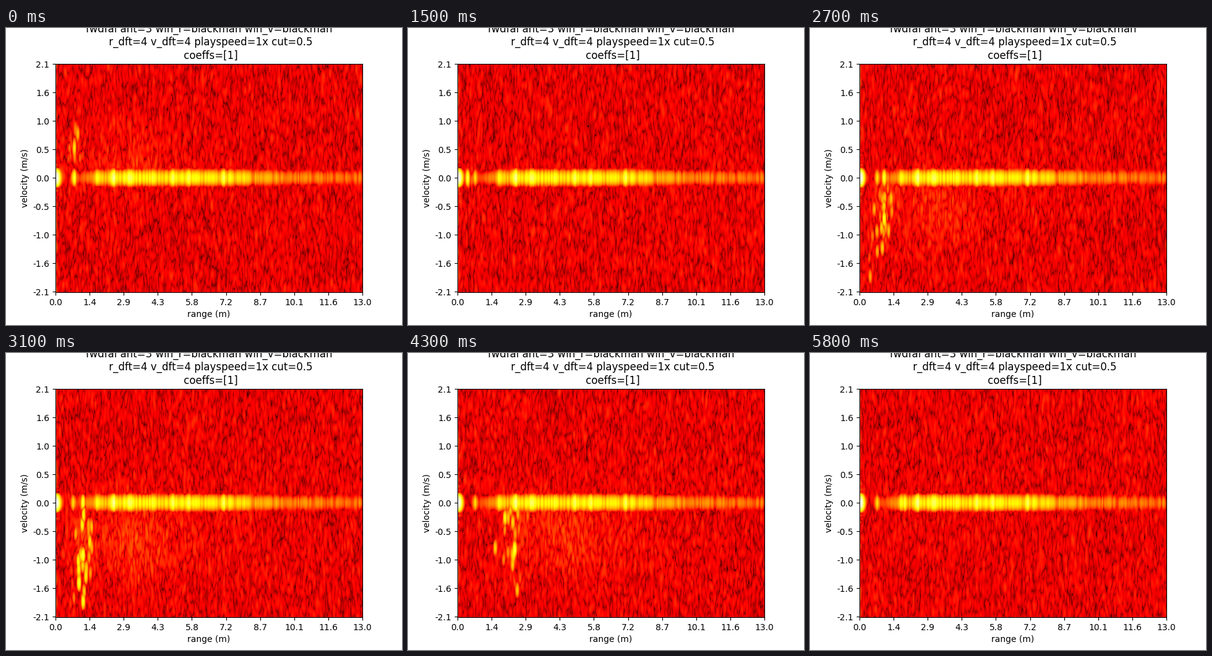
Write a matplotlib script that moves like this. It is 640 px wide and 480 px high and loops after 5.9 s.

```python
import numpy as np
import matplotlib.pyplot as plt
from matplotlib.animation import FuncAnimation

FRAMES, STEP = 59, 100
COLS, ROWS, HEIGHT = 496, 256, 370    # map columns, map rows, height in pixels
CHIRPS, SAMPLES, PAD = 64, 344, 516   # raw data block, padded range FFT
R_MAX, V_MAX = 13.0, 2.08
R_BIN, V_BIN = PAD / SAMPLES, HEIGHT / CHIRPS
FLOOR, PER_DB = 0.335, 0.0095         # colour level of the noise, step per dB

cols = np.arange(COLS)
rows = (np.arange(ROWS) - (ROWS - 1) / 2) * HEIGHT / ROWS  # px below v = 0


def lobe(d):
    """Spectrum of a Blackman window, d in bins, peak 1."""
    s = np.sinc
    return (0.42 * s(d) + 0.25 * (s(d - 1) + s(d + 1))
            + 0.04 * (s(d - 2) + s(d + 2))) / 0.42


def bump(x, x0, width):
    return np.exp(-((x - x0) / width) ** 2)


def amp(level):
    """Amplitude relative to the noise for a colour level."""
    return 10 ** ((level - FLOOR) / PER_DB / 20)


# The walker comes close, turns, walks away and stops: column and height.
TIMES = [0, .8, 1.5, 2.3, 3.1, 3.7, 4.3, 4.8, 5.2, 5.8]
TRACK_X = [30, 22, 16, 35, 44, 68, 92, 88, 78, 73]
TRACK_Y = [-48, -30, 2, 48, 85, 95, 75, 15, -25, 0]


def walker(t):
    return np.interp(t, TIMES, TRACK_X), np.interp(t, TIMES, TRACK_Y)


def body_level(y):
    return 0.47 + 3.5e-5 * y ** 2


def make_glints(n=170):
    """Short reflections of limbs scattered around the walker."""
    rng = np.random.default_rng(7)
    t = rng.uniform(-0.2, 5.4, n)
    x, y = walker(t)
    dx, dy, dl = rng.normal(size=(3, n))
    level = body_level(y) + 0.06 * dl
    phase = np.exp(2j * np.pi * rng.random(n))
    return (t, x + (3 + 0.1 * x) * dx, y + (4 + 0.45 * np.abs(y)) * dy,
            amp(np.minimum(level, 0.8)) * phase)


def make_profile():
    """Colour level of the static echoes along the range axis."""
    rng = np.random.default_rng(11)
    x = [0, 5, 11, 15, 21, 28, 34, 62, 92, 300, 320, 400, 496]
    y = [1.05, .9, .48, .33, .33, .72, .45, .62, .74, .71, .62, .55, .52]
    level = np.interp(cols, x, y)
    for peak in (66, 93, 121, 190, 214, 271):
        level += 0.12 * bump(cols, peak, 4)
    raw = rng.normal(size=(2, COLS))
    kernel = lobe(np.arange(-8, 9) / R_BIN)
    re, im = (np.convolve(r, kernel, "same") for r in raw)
    fading = np.log10(np.hypot(re, im))
    fading = np.clip(fading - np.median(fading), -0.5, 0.5)
    return level + 0.14 * fading * np.clip((cols - 32) / 40, 0, 1)


G_T, G_X, G_Y, G_A = make_glints()
PROFILE = make_profile()
WINDOW = np.outer(np.blackman(CHIRPS), np.blackman(SAMPLES))
MEDIAN = np.sqrt((WINDOW ** 2).sum() * np.log(2))
EDGE = 20 * bump(cols, 0, 1.6)


def noise(i):
    rng = np.random.default_rng(100 + i)
    re, im = rng.normal(0, np.sqrt(0.5), (2, CHIRPS, SAMPLES))
    block = np.zeros((ROWS, PAD), complex)
    block[:CHIRPS, :SAMPLES] = (re + 1j * im) * WINDOW
    # centre the block on zero so that the spectrum has a flat phase
    block = np.roll(block, (-CHIRPS // 2, -SAMPLES // 2), (0, 1))
    return np.fft.fft2(block)[:, :COLS] / MEDIAN


def diffuse(t):
    """Noise gain: the edge column, the body and its echoes off the walls."""
    x, y = walker(t)
    speed = abs(y)
    gain = np.tile(EDGE, (ROWS, 1))
    for shift, width, scale in ((0, 22, .08), (80, 50, .09), (130, 110, .05)):
        gain += scale * speed * np.outer(
            bump(rows, 0.7 * y, 25 + 0.5 * speed),
            bump(cols, x + shift, width))
    return 10 ** (gain / 20)


def static(t):
    x, _ = walker(t)
    level = np.maximum(PROFILE, 0.8 * bump(cols, x, 6))
    return np.outer(lobe(rows / V_BIN), amp(level))


def echoes(x, y, a):
    v = lobe((rows[:, None] - y) / V_BIN)
    r = lobe((cols - x[:, None]) / R_BIN)
    return (v * a) @ r


def moving(t):
    x, y = walker(t)
    torso = amp(min(body_level(y) + 0.15, 0.8))
    dt = t - G_T
    # negative velocity means a growing range
    drift = dt * G_Y / (HEIGHT / 2) * V_MAX * COLS / R_MAX
    return echoes(np.append(G_X + drift, x), np.append(G_Y, y),
                  np.append(G_A * bump(dt, 0, 0.25), torso))


def range_doppler(i):
    t = i * STEP / 1000
    z = noise(i) * diffuse(t) + static(t) + moving(t)
    return FLOOR + PER_DB * 20 * np.log10(np.abs(z) + 1e-3)


fig, ax = plt.subplots(figsize=(6.4, 4.8), dpi=100)
img = ax.imshow(range_doppler(0), cmap="hot", vmin=0, vmax=1, aspect="auto",
                extent=(0, R_MAX, -V_MAX, V_MAX))
xt, yt = np.linspace(0, R_MAX, 10), np.linspace(-V_MAX, V_MAX, 9)
ax.set_xticks(xt, [f"{v:.1f}" for v in xt])
# velocity ticks sit on the centres of the outer rows
ax.set_yticks(yt * (1 - 1 / ROWS), [f"{v:.1f}" for v in yt])
ax.set_xlabel("range (m)")
ax.set_ylabel("velocity (m/s)")
ax.set_title("fwdfal ant=3 win_r=blackman win_v=blackman\n"
             " r_dft=4 v_dft=4 playspeed=1x cut=0.5\n coeffs=[1]")


def update(i):
    img.set_data(range_doppler(i))
    return [img]


anim = FuncAnimation(fig, update, frames=FRAMES, interval=STEP, repeat=True)
plt.show()
```
